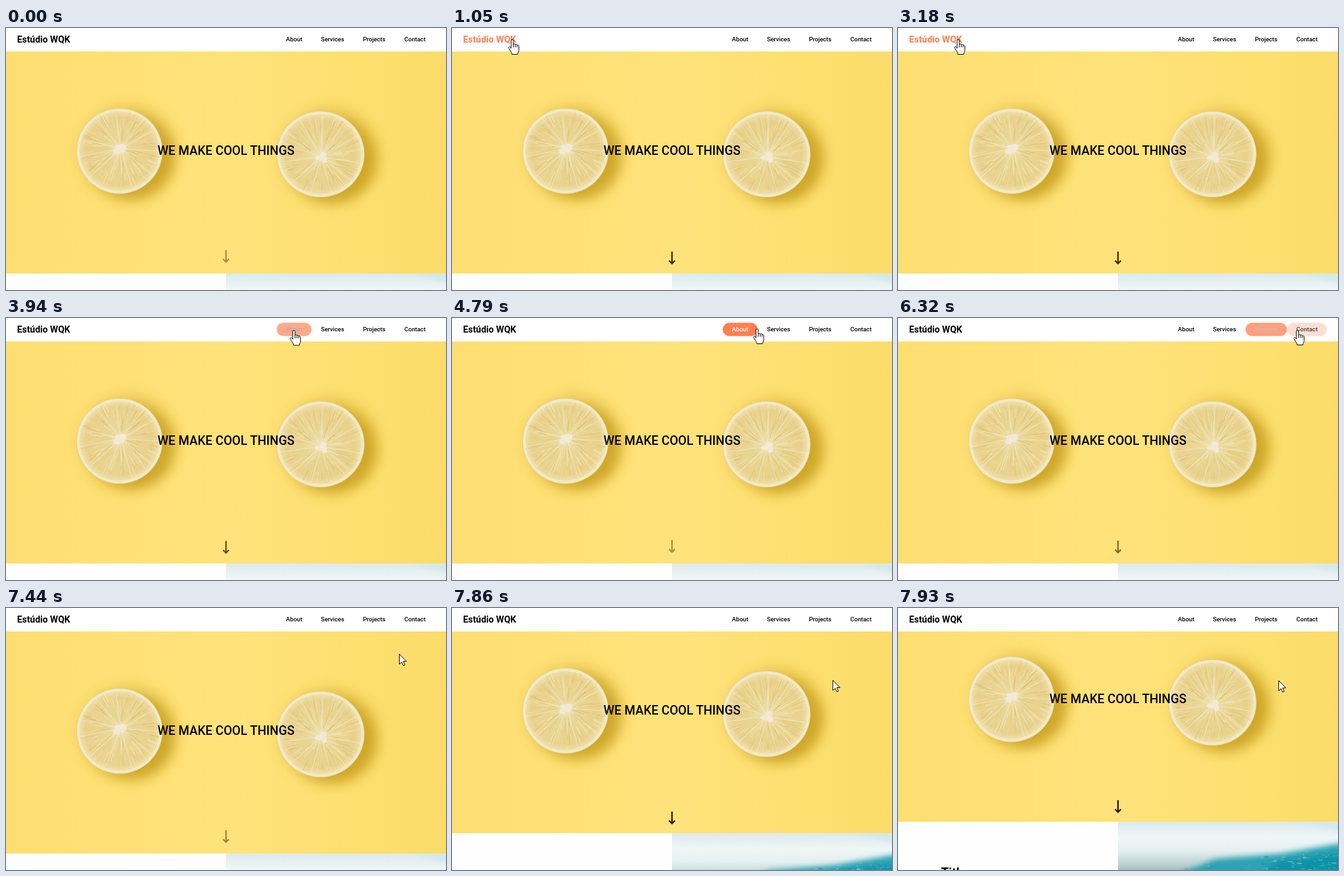
These frames come from a looping animation (694x413 px, 8 s). An HTML page:

```html
<!DOCTYPE html>
<html lang="en">
<head>
<meta charset="utf-8">
<title>Landing page</title>
<style>
  html, body { margin: 0; width: 100%; height: 100%; overflow: hidden; background: #fefefe; }
  svg { display: block; font-family: Roboto, sans-serif; font-weight: 500; }
</style>
</head>
<body>
<svg id="stage" width="694" height="413" viewBox="0 0 694 413">
  <defs>
    <linearGradient id="wall">
      <stop offset="0" stop-color="#fdde71"/>
      <stop offset=".22" stop-color="#fee075"/>
      <stop offset=".5" stop-color="#ffe27a"/>
      <stop offset=".8" stop-color="#fddf70"/>
      <stop offset="1" stop-color="#fbdc69"/>
    </linearGradient>
    <radialGradient id="flesh">
      <stop offset="0" stop-color="#efe2b4"/>
      <stop offset=".35" stop-color="#e9d594"/>
      <stop offset=".85" stop-color="#e8d18a"/>
      <stop offset="1" stop-color="#eedfaa"/>
    </radialGradient>
    <linearGradient id="sky" x2="0" y2="1">
      <stop offset="0" stop-color="#dceaed"/>
      <stop offset=".3" stop-color="#eff6f6"/>
      <stop offset=".55" stop-color="#e4efef"/>
      <stop offset=".8" stop-color="#bdd3d3"/>
      <stop offset="1" stop-color="#94b0ae"/>
    </linearGradient>
    <filter id="soft" x="-50%" y="-50%" width="200%" height="200%"><feGaussianBlur stdDeviation="9"/></filter>
    <filter id="mist" x="-20%" y="-50%" width="140%" height="200%"><feGaussianBlur stdDeviation="4"/></filter>
    <filter id="fuzzy"><feGaussianBlur stdDeviation=".6"/></filter>
    <clipPath id="photoClip"><path d="M347 387H694V470H347Z"/></clipPath>
  </defs>

  <g id="page">
    <rect y="37" width="694" height="350" fill="url(#wall)"/>
    <g id="lemons"></g>
    <text x="347" y="200" font-size="19.5" text-anchor="middle">WE MAKE COOL THINGS</text>
    <path id="down" d="M347 350V369M342.4 364.2L347 368.8L351.6 364.2" fill="none" stroke="#140c00" stroke-width="2.3"/>
    <text x="68" y="474" font-size="19.5" font-weight="700">Title</text>
    <g id="photo" clip-path="url(#photoClip)">
      <rect x="347" y="387" width="347" height="83" fill="url(#sky)"/>
      <g filter="url(#mist)">
        <path d="M640 387H700V402Z" fill="#d0e8ea"/>
        <path d="M430 475L500 446L600 438L705 420V480Z" fill="#2aa3b4"/>
        <path d="M560 475L600 448L705 436V480Z" fill="#1193a8"/>
      </g>
    </g>
  </g>

  <rect width="694" height="37" fill="#fff"/>
  <text id="logo" x="17.5" y="23" font-size="14.4" font-weight="700">Estúdio WQK</text>
  <g id="nav" font-size="9.6"></g>
  <g id="cursor" fill="#fff" stroke="#000" stroke-linejoin="round">
    <path id="pointer" d="M.5 .5V16.5L4.2 13L6.8 18.7L9.2 17.6L6.7 12H11.7Z"/>
    <path id="hand" d="M-1.8 14V2A1.8 1.8 0 0 1 1.8 2V8C2.2 6.6 4.8 6.8 4.9 8.5C5.4 7.3 7.7 7.6 7.8 9.4C8.3 8.4 10.5 8.8 10.5 11V16.5C10.5 20 8.6 20.5 8.6 23.5H-.4C-.4 20.5 -3 18.5 -5.2 14.2C-6.4 11.6 -4.4 10.6 -3 12.2ZM1.8 8V12.5M4.9 8.5V12.5M7.8 9.4V12.5"/>
  </g>
</svg>

<script>
const $ = id => document.getElementById(id);
const clamp = x => Math.max(0, Math.min(1, x));
const smooth = x => x * x * (3 - 2 * x);

function add(parent, tag, attrs, text = '') {
  const el = document.createElementNS('http://www.w3.org/2000/svg', tag);
  for (const key in attrs) el.setAttribute(key, attrs[key]);
  el.textContent = text;
  return parent.appendChild(el);
}

let seed = 7;
const random = () => (seed = seed * 16807 % 2147483647) / 2147483647;

// A cut lemon: soft shadow, rind, flesh, fibres, membranes and a pale core.
function lemon(cx, cy, rx, ry, coreX, coreY) {
  const g = add($('lemons'), 'g', {});
  const disc = (inset, attrs) => add(g, 'ellipse', { cx, cy, rx: rx - inset, ry: ry - inset, ...attrs });
  const shadow = (dx, dy, grow, opacity) =>
    disc(-grow, { cx: cx + dx, cy: cy + dy, fill: '#c39a17', opacity, filter: 'url(#soft)' });
  shadow(14, 3, 13, .22);
  shadow(19, 8, -1, .75);
  disc(0, { fill: '#e2cf8c' });
  disc(.8, { fill: '#f3e9c4' });
  disc(5, { fill: 'url(#flesh)' });

  const ray = (angle, from, to, attrs) => {
    const at = k => `${coreX + (cx + rx * Math.cos(angle) - coreX) * k} ${coreY + (cy + ry * Math.sin(angle) - coreY) * k}`;
    add(g, 'path', { d: `M${at(from)}L${at(to)}`, 'stroke-linecap': 'round', filter: 'url(#fuzzy)', ...attrs });
  };
  for (let i = 0; i < 170; i++) {
    const from = .15 + random() * .6;
    ray(random() * 6.283, from, Math.min(.92, from + .1 + random() * .25), {
      stroke: random() < .6 ? '#f3e8bd' : '#d9bd69',
      'stroke-width': .6 + random() * 1.2,
      opacity: .25 + random() * .4
    });
  }
  for (let i = 0; i < 11; i++)
    ray((i + random() * .4) * 6.283 / 11, 0, .94, { stroke: '#f3e9c8', 'stroke-width': 1.2, opacity: .7 });
  for (let i = 0; i < 9; i++)
    add(g, 'ellipse', {
      cx: coreX + (random() - .5) * 13, cy: coreY + (random() - .5) * 10,
      rx: 2 + random() * 4, ry: 2 + random() * 3, fill: '#f2ead6', filter: 'url(#fuzzy)'
    });
}
lemon(179, 194, 68, 67.5, 181, 190);
lemon(496, 199, 69.5, 68, 497, 203);

// Foam and dark ripples on the sea, which rises to the right.
for (let i = 0; i < 130; i++) {
  const across = Math.sqrt(random());
  add($('photo'), 'ellipse', {
    cx: 440 + across * 254, cy: 454 - across * 24 + random() * 30, rx: .8 + random() * 4, ry: .5 + random(),
    fill: ['#cfe6e7', '#0f8ca4', '#58bcc6'][i % 3], opacity: .15 + random() * .35, filter: 'url(#fuzzy)'
  });
}

// Hover spans in seconds; each fades in and out.
const FADE = .24;
const logoSpan = { start: .81, end: 3.33 };
const items = [
  ['About', 427, 482, 3.78, 4.8],
  ['Services', 482, 548, 4.8, 5.69],
  ['Projects', 548, 613.5, 5.69, 6.26],
  ['Contact', 613.5, 676.5, 6.26, 7.12]
].map(([label, left, right, start, end]) => ({
  start, end,
  pill: add($('nav'), 'rect', { x: left, y: 7.5, width: right - left, height: 21, rx: 10.5, fill: 'coral' }),
  text: add($('nav'), 'text', { x: (left + right) / 2, y: 21.2, 'text-anchor': 'middle' }, label)
}));
const hover = (t, { start, end }) => clamp((t - start) / FADE) - clamp((t - end) / FADE);
const isOver = (t, { start, end }) => t >= start && t < end;

// Cursor stops: time, x, y
const stops = [
  [.62, 412, 398], [.809, 412, 398], [.81, 95, 18], [3.25, 95, 18], [3.78, 428, 20],
  [3.92, 454, 19.5], [4.5, 457, 20], [4.8, 482, 17], [5.1, 506, 16], [5.41, 508, 15.5],
  [5.69, 548, 17], [6, 580, 18], [6.26, 615, 19], [6.32, 630, 19], [6.5, 640, 20],
  [6.95, 639, 20], [7.12, 635, 29], [7.44, 620, 72], [7.75, 601, 112], [7.9, 600, 114], [8, 600, 114]
];
function cursorAt(t) {
  const i = Math.max(1, stops.findIndex(stop => stop[0] > t));
  const [a, b] = [stops[i - 1], stops[i]];
  const k = clamp((t - a[0]) / (b[0] - a[0]));
  return [a[1] + (b[1] - a[1]) * k, a[2] + (b[2] - a[2]) * k];
}

// The down arrow rests until the page becomes active, then pulses.
function pulse(t) {
  if (t < .81) return t < .07 ? 0 : .05;
  if (t < 3.18) return .05 + .8 * smooth(clamp((t - .76) / .29));
  return (1 + Math.cos(Math.PI * (t - 7.93) / .615)) / 2;
}

function draw(t) {
  const scroll = 50 * smooth(clamp((t - 7.76) / .17));
  $('page').setAttribute('transform', `translate(0 ${-scroll})`);

  const u = pulse(t);
  $('down').setAttribute('transform', `translate(0 ${3 * u})`);
  $('down').setAttribute('opacity', .38 + .57 * u);

  const glow = hover(t, logoSpan);
  $('logo').setAttribute('fill', `rgb(${255 * glow},${127 * glow},${80 * glow})`);
  for (const item of items) {
    const p = hover(t, item), tone = 255 * p;
    item.pill.setAttribute('opacity', p);
    item.text.setAttribute('fill', `rgb(${tone},${tone},${tone})`);
  }

  const overLink = [logoSpan, ...items].some(span => isOver(t, span));
  $('cursor').setAttribute('transform', `translate(${cursorAt(t)})`);
  $('cursor').setAttribute('visibility', t < .62 ? 'hidden' : 'visible');
  $('hand').setAttribute('display', overLink ? 'inline' : 'none');
  $('pointer').setAttribute('display', overLink ? 'none' : 'inline');
}

function frame() {
  draw(performance.now() % 8000 / 1000);
  requestAnimationFrame(frame);
}
frame();
</script>
</body>
</html>
```
